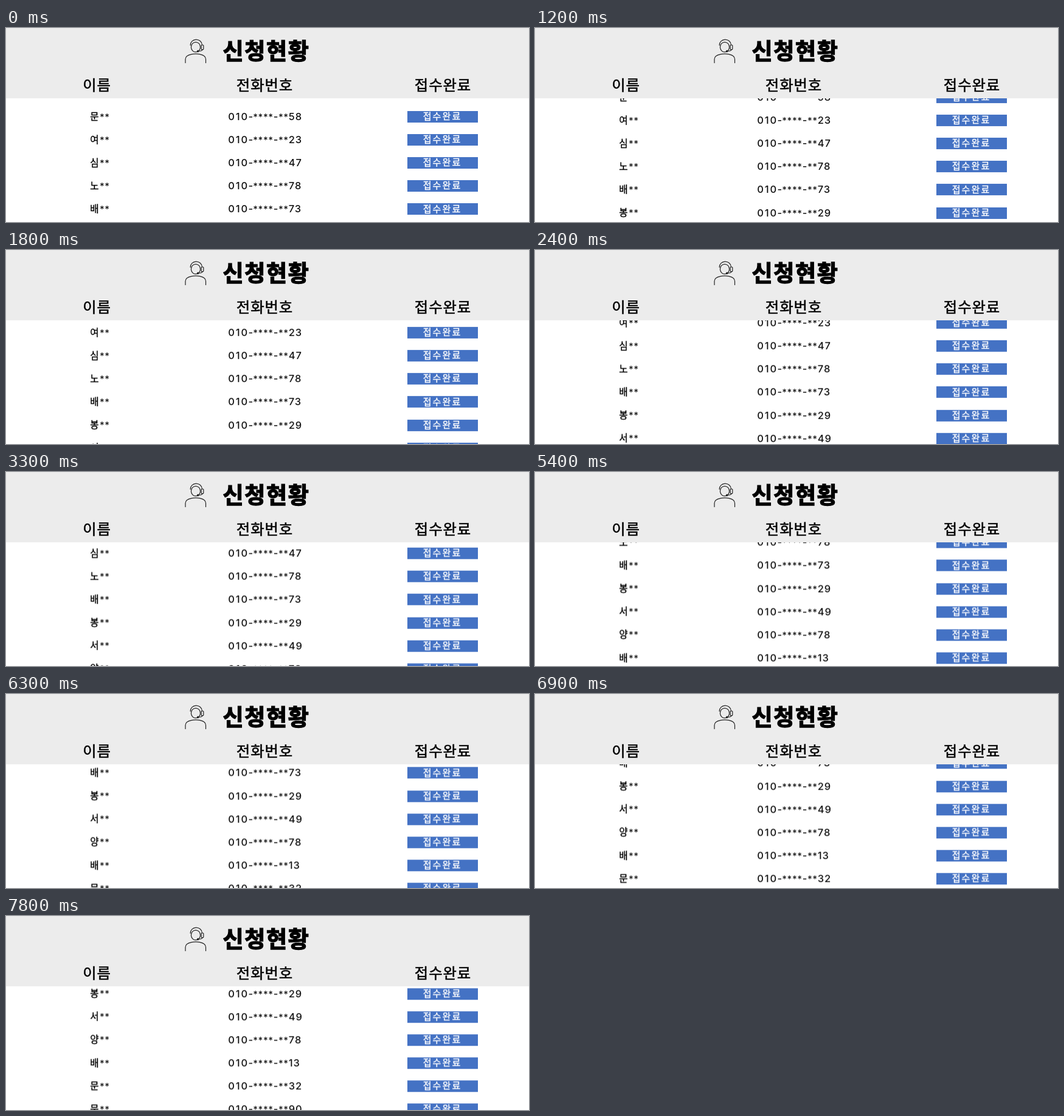
An HTML page for the animation above (8 s loop, 860 by 320 pixels).

```html
<!DOCTYPE html>
<html lang="ko">
<head>
<meta charset="utf-8">
<style>
html, body { margin: 0; width: 100%; height: 100%; overflow: hidden; background: #fff; }
svg { display: block; width: 860px; height: 320px; }
text { font-family: "Noto Sans CJK KR", "Noto Sans CJK", "Noto Sans KR", sans-serif; fill: #000; }
.title { font-size: 37px; font-weight: 900; letter-spacing: 1.7px; stroke: #000; stroke-width: 1.4px; }
.head { font-size: 24.4px; letter-spacing: .9px; stroke: #000; stroke-width: .55px; }
.title, .head { text-anchor: middle; }
.name { font-size: 15.6px; stroke: #000; stroke-width: .35px; }
.num, .star { font-family: Inter, "Noto Sans", sans-serif; font-size: 16.5px; font-weight: 500; fill: #111; }
.num { letter-spacing: 1px; }
.wide { letter-spacing: 1.9px; }
.star { font-size: 15px; letter-spacing: .5px; }
.done { font-size: 15px; letter-spacing: 2.1px; fill: #fff; stroke: #fff; stroke-width: .35px; }
.bar { fill: #4472c4; shape-rendering: crispEdges; }
.icon { fill: none; stroke: #222; stroke-width: 1.2; stroke-linecap: round; stroke-linejoin: round; }

/* 26 hard steps of 300 ms, then a 200 ms hold */
#list { animation: scroll 8s -4ms infinite; }
@keyframes scroll {
  0% { transform: translateY(0); animation-timing-function: steps(26, end); }
  97.5%, 100% { transform: translateY(-208.8px); }
}
</style>
</head>
<body>
<svg viewBox="0 0 860 320">
  <g id="list"></g>
  <rect width="860" height="116" fill="#ececec"/>
  <g class="icon">
    <path d="M295 57.5v-6c0-4.6 4-7 10-8.2q7-1.4 14 0c6 1.2 9.5 3.6 9.5 8.2v6"/>
    <ellipse cx="312" cy="31.5" rx="7.6" ry="8.2"/>
    <path d="M303.2 28.5A9.6 9.2 0 0 1 322.4 28"/>
    <rect x="321.2" y="28" width="3.6" height="7.6" rx="1"/>
    <path d="M323 35.8q-1 2.4-6 2.4"/>
    <circle cx="315.6" cy="38.2" r="1.2" fill="#222"/>
  </g>
  <text class="title" x="428.1" y="51.8">신청현황</text>
  <text class="head" x="149.5" y="103.2">이름</text>
  <text class="head" x="425.5" y="103.2">전화번호</text>
  <text class="head" x="718.5" y="103.2">접수완료</text>
</svg>
<script>
const PITCH = 38.1;
const people = [
  ['문', 58], ['여', 23], ['심', 47], ['노', 78], ['배', 73], ['봉', 29],
  ['서', 49], ['양', 78], ['배', 13], ['문', 32], ['문', 90]
];

const row = ([name, end], i) => `
  <g transform="translate(0 ${(i * PITCH).toFixed(1)})">
    <text y="151.8"><tspan class="name" x="138.3">${name}</tspan><tspan class="star" x="154">**</tspan></text>
    <text y="152"><tspan class="num wide" x="365.3">010</tspan><tspan class="num" x="398.6">-</tspan><tspan
      class="star" x="406.3">****</tspan><tspan class="num" x="439.8">-</tspan><tspan
      class="star" x="448">**</tspan><tspan class="num" x="464.7">${end}</tspan></text>
    <rect class="bar" x="660" y="137" width="116" height="19"/>
    <text class="done" x="685.7" y="151.2">접수완료</text>
  </g>`;

document.getElementById('list').innerHTML = people.map(row).join('');
</script>
</body>
</html>
```
